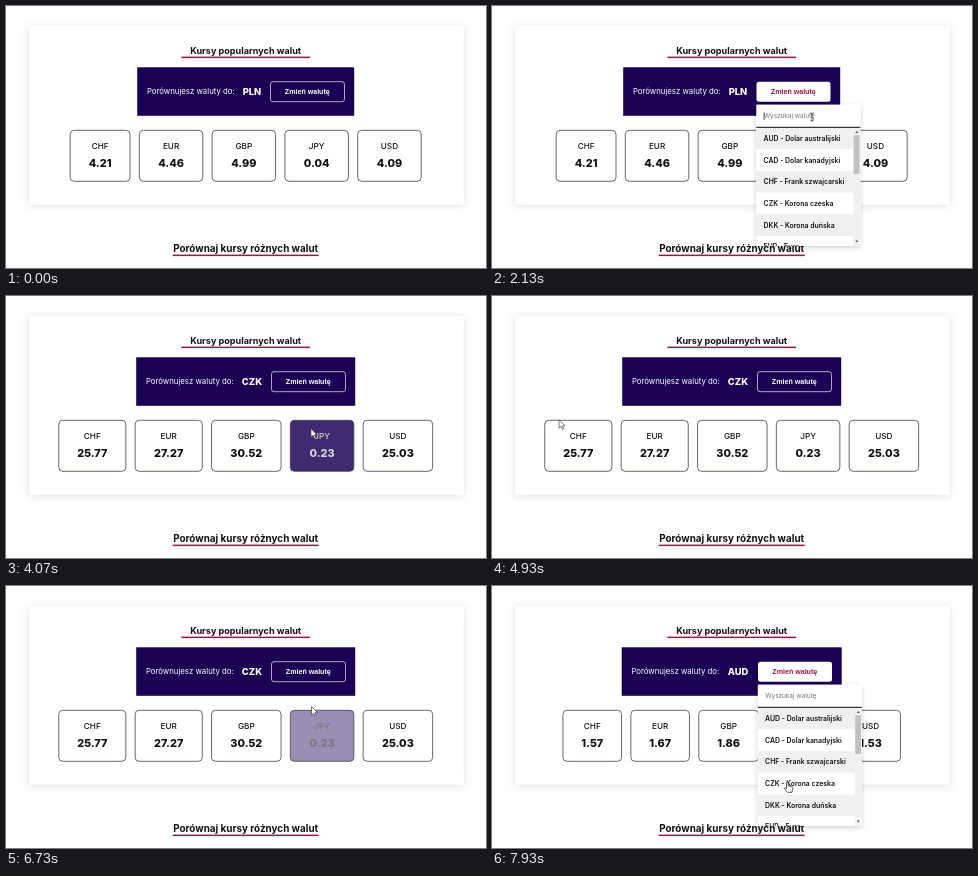
Recreate the animation shown at these times as an HTML page. Size 480 by 262 pixels, loop 8 s.

```html
<!DOCTYPE html>
<html lang="pl">
<head>
<meta charset="utf-8">
<title>Kursy walut</title>
<style>
  html, body { margin: 0; width: 100%; height: 100%; overflow: hidden; background: #fff; }
  svg { display: block; width: 100vw; height: 100vh; font-family: Inter, "Open Sans", sans-serif; }
  .button { font: bold 7.1px "Liberation Sans", Arial, sans-serif; }
</style>
</head>
<body>
<svg id="stage" viewBox="0 0 480 262" xmlns="http://www.w3.org/2000/svg"></svg>
<script>
const LOOP = 8000, FRAME = 1000 / 15, FADE = 240;
const CENTRE = 239.7, CARD_TOP = 124.3, CARD_H = 51, GAP = 9.3;
const MENU_W = 104, LIST_TOP = 121.8, ROW_H = 21.65;
const NAVY = [26, 1, 83], WHITE = [255, 255, 255], BLACK = [17, 17, 17], CRIMSON = '#a01447';

const CODES = ['CHF', 'EUR', 'GBP', 'JPY', 'USD'];
const OPTIONS = ['AUD - Dolar australijski', 'CAD - Dolar kanadyjski', 'CHF - Frank szwajcarski',
  'CZK - Korona czeska', 'DKK - Korona duńska', 'EUR - Euro'];
// "extra" is how much wider the code is than PLN.
const BASES = [
  { code: 'PLN', extra: 0, rates: '4.21 4.46 4.99 0.04 4.09' },
  { code: 'CZK', extra: 2, rates: '25.77 27.27 30.52 0.23 25.03' },
  { code: 'AUD', extra: 3, rates: '1.57 1.67 1.86 0.02 1.53' },
].map(layOut);

// Every click toggles the menu; closing it switches the base currency.
const CLICKS = [1130, 3870, 7065, 7330, 7665];
const SWITCH_DELAY = 90, TYPE_START = 2995, KEY_TIME = 133.4, BLINK = 333.4;

const BUTTON = [305, 86], FIELD = [320, 111], FIRST_OPTION = [305, LIST_TOP + ROW_H / 2];
const VISITS = [
  [[60, [408, 236]], [430, [385, 150]], [900, BUTTON], [1200, BUTTON], [1600, FIELD], [3600, FIELD],
   [3800, FIRST_OPTION], [4150, FIRST_OPTION], [4460, [296, 112]], [4930, [67, 123.7]],
   [5330, [345, 165]], [5480, [470, 195]]],
  [[5860, [449, 162]], [6400, [320, 150]], [6733, [305.5, 120.5]], [6930, BUTTON], [7100, BUTTON],
   [7270, FIRST_OPTION], [7400, FIRST_OPTION], [7600, BUTTON], [7700, BUTTON], [7940, [294.5, 197]]],
];

const stage = document.getElementById('stage');
const pen = document.createElement('canvas').getContext('2d');
const clamp = v => Math.max(0, Math.min(1, v));
const ease = k => k * k * (3 - 2 * k);
const mix = (a, b, k) => `rgb(${a.map((v, i) => Math.round(v + (b[i] - v) * k))})`;
const inside = (p, x, y, w, h) => p && p.x >= x && p.x <= x + w && p.y >= y && p.y <= y + h;
const clicksBy = t => CLICKS.filter(c => c <= t).length;
const isOpen = t => clicksBy(t) % 2 === 1;
const baseAt = t => BASES[Math.floor(clicksBy(t - SWITCH_DELAY) / 2)];

// Cards grow with their rate, whose figures 1 and 7 are narrow.
function cardWidth(rate) {
  const count = digit => rate.split(digit).length - 1;
  return 63.5 + 6 * (rate.length - 4) - 3.7 * count('1') - 1.2 * count('7');
}

function layOut({ code, extra, rates }) {
  const width = 217 + extra, left = CENTRE - width / 2, button = left + width - 83.7;
  const cards = rates.split(' ').map(rate => ({ rate, w: cardWidth(rate) }));
  let x = CENTRE - (cards.reduce((sum, c) => sum + c.w, 0) + GAP * (cards.length - 1)) / 2;
  for (const c of cards) {
    c.x = x;
    x += c.w + GAP;
  }
  return { code, width, left, button, cards, codeX: button - 18.5 - extra / 2 };
}

function pointerAt(t) {
  const path = VISITS.find(v => t >= v[0][0] && t < v[v.length - 1][0]);
  if (!path) return null;
  const i = path.findIndex(stop => stop[0] > t);
  const [t0, [x0, y0]] = path[i - 1], [t1, [x1, y1]] = path[i];
  const e = ease((t - t0) / (t1 - t0));
  return { x: x0 + (x1 - x0) * e, y: y0 + (y1 - y0) * e };
}

// Replays the pointer up to t, fading each card in and out as it passes.
function hoversAt(t) {
  const levels = CODES.map(() => 0);
  for (let at = 0; at <= t + 1; at += FRAME) {
    const p = isOpen(at) ? null : pointerAt(at);
    baseAt(at).cards.forEach((c, i) => {
      const sign = inside(p, c.x, CARD_TOP, c.w, CARD_H) ? 1 : -1;
      levels[i] = clamp(levels[i] + sign * FRAME / FADE);
    });
  }
  return levels;
}

const rect = (x, y, w, h, fill, more = '') =>
  `<rect x="${x}" y="${y}" width="${w}" height="${h}" fill="${fill}" ${more}/>`;
const text = (str, x, y, size, weight, fill = '#111', more = '') =>
  `<text x="${x}" y="${y}" font-size="${size}" font-weight="${weight}" fill="${fill}" ${more}>${str}</text>`;
const centred = (str, x, y, size, weight, fill) =>
  text(str, x, y, size, weight, fill, 'text-anchor="middle"');

const heading = (str, y, size, lineW) =>
  centred(str, CENTRE, y, size, 700) + rect(CENTRE - lineW / 2, y + 2.4, lineW, 1.5, CRIMSON);

function panel({ left, width, button, code, codeX }, lit) {
  const label = `<text class="button" x="${button + 36.8}" y="88.3" text-anchor="middle" fill="${lit ? CRIMSON : '#fff'}">Zmień walutę</text>`;
  return rect(left, 61.3, width, 48.5, mix(NAVY, NAVY, 0))
    + text('Porównujesz waluty do:', left + 9.7, 88.3, 7.8, 400, '#fff')
    + centred(code, codeX, 88.6, 9.4, 800, '#fff')
    + rect(button, 75.7, 74, 20, lit ? '#fff' : 'none', `rx="2.5" stroke="#fff" stroke-width="${lit ? 0 : .65}"`)
    + label;
}

function card({ x, w, rate }, code, level) {
  const ink = mix(BLACK, WHITE, level), mid = x + w / 2;
  return rect(x, CARD_TOP, w, CARD_H, mix(WHITE, NAVY, level), 'rx="4" stroke="#403e52" stroke-width=".8"')
    + centred(code, mid, 143.3, 8.2, 500, ink)
    + centred(rate, mid, 161, 10.9, 800, ink);
}

function menu(x, query, caret) {
  const rows = OPTIONS.filter(o => o.toLowerCase().includes(query));
  const listH = Math.min(118, rows.length * ROW_H);
  let list = rows.map((row, i) => {
    const y = LIST_TOP + i * ROW_H;
    return rect(x, y, MENU_W, ROW_H, i % 2 ? '#fff' : '#f0f0f0') + text(row, x + 7.3, y + 13.2, 6.88, 600);
  }).join('');
  if (rows.length === OPTIONS.length) {
    list += rect(x + 97, LIST_TOP, 7, listH, '#f1f1f1') + rect(x + 97.4, 129.3, 5.8, 38.7, '#c1c1c1')
      + `<path d="M${x + 98.9} 127h3.2l-1.6-2zM${x + 98.9} 234.4h3.2l-1.6 2z" fill="#555"/>`;
  }
  pen.font = '400 64px Inter, "Open Sans", sans-serif';
  const caretX = x + 7.4 + pen.measureText(query).width / 10;
  return rect(x, 98.6, MENU_W, LIST_TOP - 98.6 + listH, '#fff', 'filter="url(#lift)"')
    + `<clipPath id="list">${rect(x, LIST_TOP, MENU_W, listH, '#000')}</clipPath><g clip-path="url(#list)">${list}</g>`
    + rect(x, 120.8, MENU_W, 1.1, '#222')
    + text(query || 'Wyszukaj walutę', x + 7.5, 112.3, 6.4, 400, query ? '#333' : '#777')
    + (caret ? rect(caretX, 106.3, .7, 7.8, '#111') : '');
}

const POINTERS = {
  arrow: '<path d="M0 0V8.4L2 6.7 3.3 9.7 4.7 9.1 3.4 6.2H6Z" fill="#fff" stroke="#444" stroke-width=".7"/>',
  beam: '<path d="M-1.7-4Q0-4 0-3Q0-4 1.7-4M0-3V3M-1.7 4Q0 4 0 3Q0 4 1.7 4" fill="none" stroke="#222" stroke-width=".8"/>',
  hand: '<path d="M0 0Q1-.9 1.8 0V3.2L5.5 4Q6.6 4.3 6.4 5.6L5.5 9.6H1L-2 6Q-2.2 4.8-1 5L0 6Z" fill="#fff" stroke="#222" stroke-width=".7"/>',
};

function pointer(p, open, onButton) {
  const kind = onButton || (open && p.y > LIST_TOP) ? 'hand' : open && p.y > 98 ? 'beam' : 'arrow';
  return `<g transform="translate(${p.x} ${p.y})">${POINTERS[kind]}</g>`;
}

const shadow = (id, dy, blur, opacity) =>
  `<filter id="${id}" x="-10%" y="-10%" width="120%" height="130%">
    <feDropShadow dx="0" dy="${dy}" stdDeviation="${blur}" flood-opacity="${opacity}"/></filter>`;

function scene(t) {
  const base = baseAt(t), open = isOpen(t), p = pointerAt(t), levels = hoversAt(t);
  const onButton = inside(p, base.button, 75.5, 74, 20.5);
  const firstMenu = clicksBy(t) === 1;
  const typed = firstMenu ? Math.max(0, Math.floor((t - TYPE_START) / KEY_TIME) + 1) : 0;
  const blinkOn = t > 1460 && Math.floor((t - 1460) / BLINK) % 2 === 0;
  const caret = firstMenu && typed <= 3 && (typed || blinkOn);

  return `<defs>${shadow('soft', 1, 4, .12)}${shadow('lift', 1.5, 2.5, .2)}</defs>`
    + rect(0, 0, 480, 262, '#fff')
    + rect(23, 20.5, 434.5, 178, '#fff', 'filter="url(#soft)"')
    + heading('Kursy popularnych walut', 48.2, 9.1, 128.7)
    + heading('Porównaj kursy różnych walut', 246.2, 9.9, 146)
    + panel(base, open || onButton)
    + base.cards.map((c, i) => card(c, CODES[i], levels[i])).join('')
    + (open ? menu(base.button - .2, 'czk'.slice(0, typed), caret) : '')
    + (p ? pointer(p, open, onButton) : '');
}

const start = performance.now();
let shown = -1;
function tick() {
  const step = Math.floor(((performance.now() - start) % LOOP) / FRAME + .05) % (LOOP / FRAME);
  if (step !== shown) {
    shown = step;
    stage.innerHTML = scene(step * FRAME);
  }
  requestAnimationFrame(tick);
}
tick();
</script>
</body>
</html>
```
